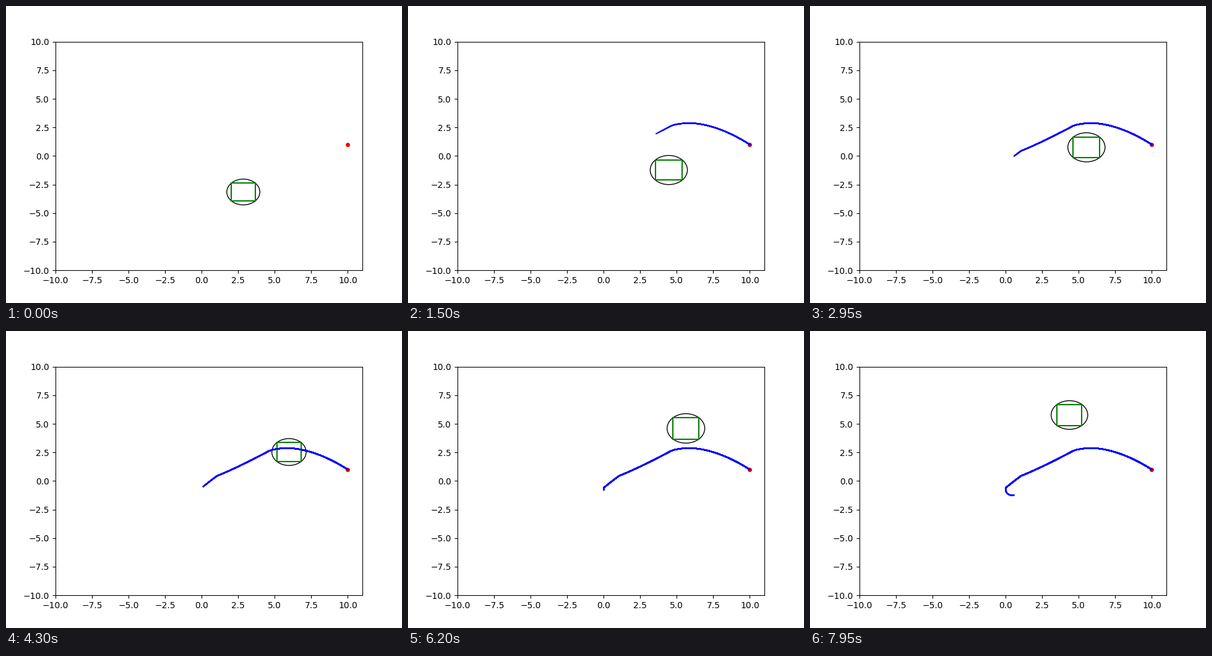
Recreate the animation shown at these times as a matplotlib script. Size 640 px wide and 480 px high, loop 8000 ms.

```python
import numpy as np
import matplotlib.pyplot as plt
from matplotlib.animation import FuncAnimation
from matplotlib.collections import LineCollection
from matplotlib.patches import Circle, Rectangle

FRAMES, STEP_MS = 160, 50
TURN_BACK, TURN_IN = 115, 124   # steps where the robot reverses, then curls


def obstacle(n):
    """Centre and half sizes of the drifting box."""
    x = 0.64 + 5.36 * np.cos(0.01225 * (n - 93.5))
    y = -0.065 + 6.14 * np.sin(0.0112 * (n - 47))
    pulse = abs(np.sin(np.pi * n / 88))
    w = 0.832 + 0.12 * (1 - n / 200) * pulse
    h = 0.765 + 0.0006 * n + 0.11 * pulse
    return x, y, w, h


def height(x):
    """Path to the origin: a straight-ish run-in capped by a bend over the obstacle."""
    return min(0.42 * x ** 1.2, 2.88 - 0.145 * abs(x - 5.85) ** 1.8)


def robot_trail():
    x, y = 10.0, 1.0
    points = [(x, y)]
    for n in range(FRAMES - 1):
        if n < TURN_BACK:
            # speeds up at first, then slows in proportion to the distance left
            x -= min(0.143 + 0.0051 * n, 0.061 * x)
            y = height(x)
        else:
            heading = -np.pi / 2 + 0.053 * max(0, n - TURN_IN)
            x += 0.0235 * np.cos(heading)
            y += 0.0235 * np.sin(heading)
        points.append((x, y))
    return np.array(points)


trail = robot_trail()

fig, ax = plt.subplots(figsize=(6.4, 4.8), dpi=100)
ax.set_xlim(-10, 11)
ax.set_ylim(-10, 10)

ax.plot(10, 1, "ro", markersize=4)
circle = ax.add_patch(Circle((0, 0), 1, fill=False, color="black", linewidth=1))
box = ax.add_patch(Rectangle((0, 0), 1, 1, fill=False, edgecolor="green", linewidth=1.5))
path = ax.add_collection(LineCollection([], colors="blue", linewidths=1.5, zorder=3,
                                        capstyle="projecting", joinstyle="round"))


def draw(n):
    x, y, w, h = obstacle(n)
    circle.set_center((x, y))
    circle.set_radius(np.hypot(w, h))
    box.set_bounds(x - w, y - h, 2 * w, 2 * h)
    # the growing path is drawn again on top of itself at every step
    path.set_segments([trail[:k + 1] for k in range(1, n + 1)])
    return circle, box, path


anim = FuncAnimation(fig, draw, frames=FRAMES, interval=STEP_MS,
                     repeat=True, repeat_delay=0)
plt.show()
```
